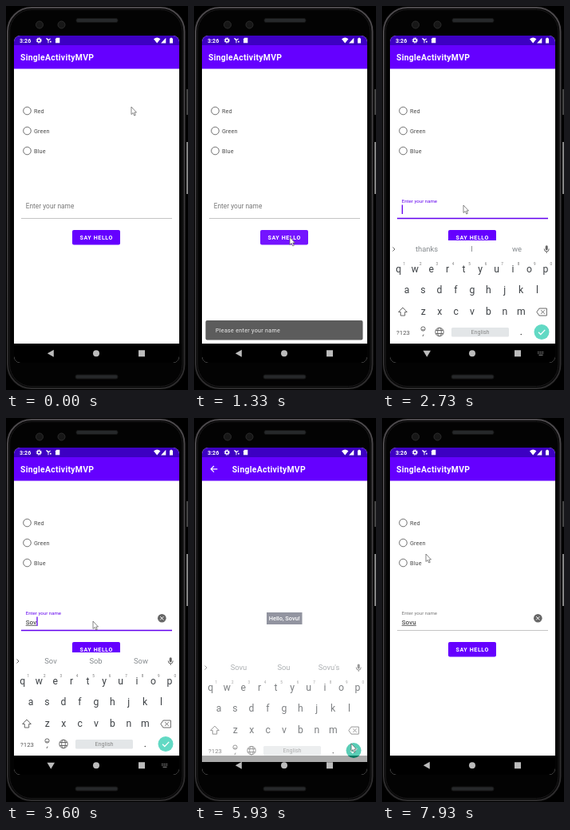
An HTML page for the animation above (8000 ms loop, 228 by 480 pixels).

```html
<!DOCTYPE html>
<html lang="en">
<head>
<meta charset="utf-8">
<title>Say hello</title>
<style>
html, body { margin: 0; width: 100%; height: 100%; overflow: hidden; background: #000; }
svg { display: block; width: 100vw; height: 100vh; }
text { font-family: Roboto, "Noto Sans", sans-serif; }
.mid { text-anchor: middle; }
.bar { font-size: 10.4px; font-weight: 600; letter-spacing: .29px; fill: #fff; }
.radio circle { fill: none; stroke: #707070; }
.radio text { font-size: 7.3px; letter-spacing: .1px; fill: #4a4a4a; }
.line { fill: none; stroke: #666; stroke-width: 1; }
.suggest { font-size: 9.4px; fill: #858a8e; }
.key { font-size: 12.2px; fill: #3d4145; }
.digit { font-size: 4.6px; fill: #777; }
</style>
</head>
<body>
<svg viewBox="0 0 228 480">
  <defs>
    <clipPath id="glass"><rect x="10" y="37" width="207" height="409" rx="8"/></clipPath>
    <linearGradient id="rim" x2="0" y2="1">
      <stop stop-color="#4c494c"/><stop offset=".5" stop-color="#3a383a"/><stop offset="1" stop-color="#2c2b2c"/>
    </linearGradient>
  </defs>

  <!-- phone -->
  <path d="M226 104h2v32h-2z" fill="#444"/>
  <path d="M226 170h2v65h-2z" fill="#858585"/>
  <rect x="2" y="2" width="221.500" height="476" rx="30" fill="#030303" stroke="url(#rim)" stroke-width="2"/>
  <rect x="4.500" y="4.500" width="216.500" height="471" rx="27.500" fill="none" stroke="#1b1a1b"/>
  <g fill="#171717" stroke="#2c2c2c"><circle cx="42" cy="23.500" r="4.500"/><circle cx="69.500" cy="23.500" r="4.500"/></g>
  <g fill="#26282a" stroke="#141414"><rect x="88" y="15.500" width="52" height="5" rx="2"/><rect x="87" y="461" width="53" height="5" rx="2"/></g>

  <g clip-path="url(#glass)">
    <path d="M9 37h209v410H9z" fill="#fff"/>

    <g id="form">
      <g id="radios"></g>
      <text id="label" x="24.700">Enter your name</text>
      <text id="value" x="24.700" y="257.500" font-size="8.1" letter-spacing=".1" fill="#222"></text>
      <path id="mark" stroke="#333" stroke-width=".8"/>
      <path id="rule"/>
      <path id="caret" stroke="#6200ee" stroke-width="1.3"/>
      <g id="clear"><circle cx="195.300" cy="250.300" r="5.300" fill="#666"/><path d="M193.200 248.200l4.200 4.200m0-4.200l-4.200 4.200" stroke="#fff"/></g>
      <rect id="button" x="83" y="280" width="60" height="18.500" rx="2"/>
      <text class="mid" x="113.300" y="292" font-size="7.1" font-weight="600" letter-spacing=".6" fill="#fff">SAY HELLO</text>
      <g id="snack">
        <rect x="14.500" y="393" width="197" height="24.500" rx="2" fill="#5c5c5c"/>
        <text x="27" y="408" font-size="7.1" letter-spacing=".32" fill="#eee">Please enter your name</text>
      </g>
    </g>

    <g id="greeting">
      <rect x="91" y="243" width="44.500" height="15" fill="#9294a0"/>
      <text id="hello" class="mid" x="113.200" y="253.300" font-size="7.4" font-weight="500" fill="#fff"></text>
    </g>

    <!-- status and app bars -->
    <path d="M9 37h209v12.500H9z" fill="#3d00c2"/>
    <path d="M9 49h209V78.500H9z" fill="#6500ff"/>
    <text x="17" y="45.800" font-size="7.1" font-weight="600" fill="#fff">3:26</text>
    <g fill="#fff">
      <circle cx="41.300" cy="43" r="2" fill="none" stroke="#fff" stroke-width="1.600"/>
      <circle cx="41.300" cy="43" r="3.200" fill="none" stroke="#fff" stroke-dasharray="1.250 1.250"/>
      <path d="M50 40.800l2.500 2.400v3h1v-3l2.500-2-.8-.8-1.700 1.400-2.500-1.800zM55 43.800h1.700v1.700h-1.700z"/>
      <path d="M63.200 39.800h4.100v6.400h-5.300v-5z"/>
      <path d="M185 41.200q4.200-3.300 8.400 0l-4.200 5.300zM200.300 39.800v6.700h-6.200zM205 40.600h1v-.9h2v.9h1v6h-4z"/>
    </g>
    <circle id="ripple" cx="25" cy="64" fill="#fff"/>
    <path id="up" d="M29.300 63.800h-8m3.700-3.800l-3.800 3.800 3.800 3.800" fill="none" stroke="#fff" stroke-width="1.200"/>
    <text id="title" class="bar" y="67.600">SingleActivityMVP</text>

    <!-- navigation bar -->
    <path d="M9 422h209v25H9z" fill="#000"/>

    <g id="keyboard">
      <path d="M9 293h209v129H9z" fill="#fff"/>
      <path class="line" d="M13.500 301.500l2.500 2.500-2.500 2.500"/>
      <g id="suggestions"></g>
      <rect x="204.700" y="299.300" width="3" height="6" rx="1.500" fill="#666"/>
      <path class="line" stroke-width=".8" d="M203.200 303.500q0 3.500 3 3.500t3-3.500M206.200 307v2"/>
      <g id="keys"></g>
      <path class="line" d="M26 377l5.300 5.500h-2.600v4.500h-5.400v-4.500h-2.600z"/>
      <path class="line" d="M193.800 382.500l3.200-4.500h9.300v9h-9.300zM199.300 380.300l4.400 4.400m0-4.400l-4.400 4.400"/>
      <text class="mid" x="26.500" y="410.500" font-size="7.800" fill="#555">?123</text>
      <g class="line" stroke-width=".8">
        <circle cx="51.500" cy="403.500" r="2.600"/><path d="M50.200 404.200q1.300 1.400 2.600 0M52 410.500l-1 2.500"/>
        <circle cx="72" cy="407.500" r="5.200"/><ellipse cx="72" cy="407.500" rx="2.300" ry="5.200"/>
        <path d="M67.300 405.500h9.400m-9.400 4h9.400"/>
      </g>
      <rect x="87" y="402" width="72" height="11.500" rx="1.500" fill="#e3e6e8"/>
      <text class="mid" x="123" y="410.300" font-size="7.100" fill="#888">English</text>
      <circle cx="174.300" cy="410.500" r=".8" fill="#444"/>
      <circle id="done" cx="200" cy="407.500" r="9.500"/>
      <path d="M196 407.700l2.800 2.800 5.400-5.600" fill="none" stroke="#fff" stroke-width="1.300"/>
    </g>

    <g fill="#bcbcbc">
      <path id="back"/>
      <circle cx="113" cy="434.300" r="4"/><path d="M166 430.300h8v8h-8z"/>
    </g>
    <g id="switcher" fill="none" stroke="#aaa" stroke-width=".8"><path d="M195 432.500h8m-8 1.800h8" stroke-dasharray="1 .6"/><path d="M196.500 436.300h5"/></g>
  </g>

  <path id="pointer" d="M0 0V9.500L2.200 7.500 3.800 11 5.300 10.300 3.800 7H6.500Z" fill="#fff" stroke="#555" stroke-width=".7"/>
</svg>

<script>
const LOOP = 8000, NAME = "Sovu";
const ACCENT = "#6200ee";
const TYPED_AT = [3330, 3470, 3600, 3770];
const SUGGESTIONS = [
  ["thanks", "I", "we"], ["S", "So", "See"], ["So", "Some", "Soon"],
  ["Sov", "Sob", "Sow"], [NAME, "Sou", NAME + "'s"]
];
// time, x, y
const POINTER = [
  [0, 157, 126], [70, 155, 130], [300, 122, 200], [530, 104, 268], [730, 96, 276],
  [930, 96, 276], [1130, 120, 289], [1900, 120, 289], [2200, 102, 249], [2800, 102, 249],
  [3130, 109, 254], [4870, 109, 254], [5270, 188, 396], [5450, 197, 407], [6400, 197, 407],
  [6670, 106, 272], [7000, 46, 120], [7230, 23, 62], [7460, 23, 62], [7900, 55, 170], [8000, 55, 170]
];

const $ = id => document.getElementById(id);
const set = (el, attrs) => { for (const k in attrs) el.setAttribute(k, attrs[k]); };
const show = (el, on) => { el.style.display = on ? "" : "none"; };
const clamp = v => Math.min(1, Math.max(0, v));
const ramp = (t, from, to) => clamp((t - from) / (to - from));
const ease = v => v * v * (3 - 2 * v);
const mix = (a, b, k) => a + (b - a) * k;
const during = (t, from, to) => t >= from && t < to;

function add(parent, tag, attrs, content = "") {
  const el = document.createElementNS("http://www.w3.org/2000/svg", tag);
  set(el, attrs);
  el.textContent = content;
  return parent.appendChild(el);
}

["Red", "Green", "Blue"].forEach((name, i) => {
  const row = add($("radios"), "g", { class: "radio", transform: `translate(26.500 ${131 + 25 * i})` });
  add(row, "circle", { r: 4.8 });
  add(row, "text", { x: 8.5, y: 2.7 }, name);
});

[["qwertyuiop", 20.8, 333], ["asdfghjkl", 31, 359.3], ["zxcvbnm", 51.7, 386]].forEach(([row, x0, y], r) =>
  [...row].forEach((letter, i) => {
    const x = x0 + 20.45 * i;
    add($("keys"), "text", { class: "key mid", x, y }, letter);
    if (!r) add($("keys"), "text", { class: "digit mid", x: x + 7, y: 324 }, (i + 1) % 10);
  }));

const words = [56, 112.5, 169].map(x => add($("suggestions"), "text", { class: "suggest mid", x, y: 307.3 }));
$("hello").textContent = `Hello, ${NAME}!`;

function pointerAt(t) {
  const i = Math.max(1, POINTER.findIndex(p => p[0] > t));
  const [a, b] = [POINTER[i - 1], POINTER[i]];
  const k = ramp(t, a[0], b[0]);
  return [mix(a[1], b[1], k), mix(a[2], b[2], k)];
}

function drawField(t) {
  const typed = TYPED_AT.filter(at => t >= at).length;
  const focused = during(t, 2400, 5800);
  const float = ease(ramp(t, 2400, 2550));
  set($("label"), {
    y: mix(252.7, 246.2, float), "font-size": mix(8.3, 6.05, float),
    "letter-spacing": .04, fill: focused ? ACCENT : "#777"
  });
  $("value").textContent = NAME.slice(0, typed);
  const end = 24.7 + (typed ? $("value").getComputedTextLength() : 0);
  set($("mark"), { d: `M24.700 259.300H${end}` });
  set($("caret"), { d: `M${end + .7} 248.500v11.500` });
  const since = t - (typed ? TYPED_AT[typed - 1] : 2400);
  show($("caret"), focused && Math.floor(since / 500) % 2 === 0);
  set($("rule"), { d: "M19 265.500H208", stroke: focused ? ACCENT : "#c4c4c4", "stroke-width": focused ? 1.4 : 1 });
  show($("clear"), typed);
  words.forEach((word, i) => { word.textContent = SUGGESTIONS[typed][i]; });
}

function draw(t) {
  const second = during(t, 5800, 7470);
  show($("form"), !second);
  show($("greeting"), second);
  show($("up"), second);
  set($("title"), { x: second ? 47.7 : 18 });
  drawField(t);

  set($("button"), { fill: during(t, 1130, 1450) ? "#7414ff" : "#6500ff" });
  const snack = ramp(t, 1170, 1320) * (1 - ramp(t, 2480, 2560));
  const size = mix(.8, 1, ease(ramp(t, 1170, 1320)));
  set($("snack"), { opacity: snack, transform: `translate(113 405) scale(${size}) translate(-113 -405)` });

  const hiding = ramp(t, 5850, 5990);
  const away = t < 5000 ? (1 - ramp(t, 2400, 2600)) ** 2 : hiding;
  set($("keyboard"), { opacity: 1 - away ** 2, transform: `translate(0 ${14 * away})` });
  show($("keyboard"), away < 1);
  set($("done"), { fill: during(t, 5600, 6000) ? "#08b592" : "#62d9c4" });

  const typing = during(t, 2450, 5850);
  set($("back"), { d: typing ? "M51.500 430.800h9.500l-4.750 8z" : "M59.800 429.800v9l-8-4.500z" });
  show($("switcher"), typing);

  set($("ripple"), { r: mix(3, 10, ramp(t, 7300, 7460)), opacity: during(t, 7300, 7470) ? .2 : 0 });
  set($("pointer"), { transform: `translate(${pointerAt(t).join(" ")})` });
}

function tick() {
  draw(performance.now() % LOOP);
  requestAnimationFrame(tick);
}
tick();
</script>
</body>
</html>
```
